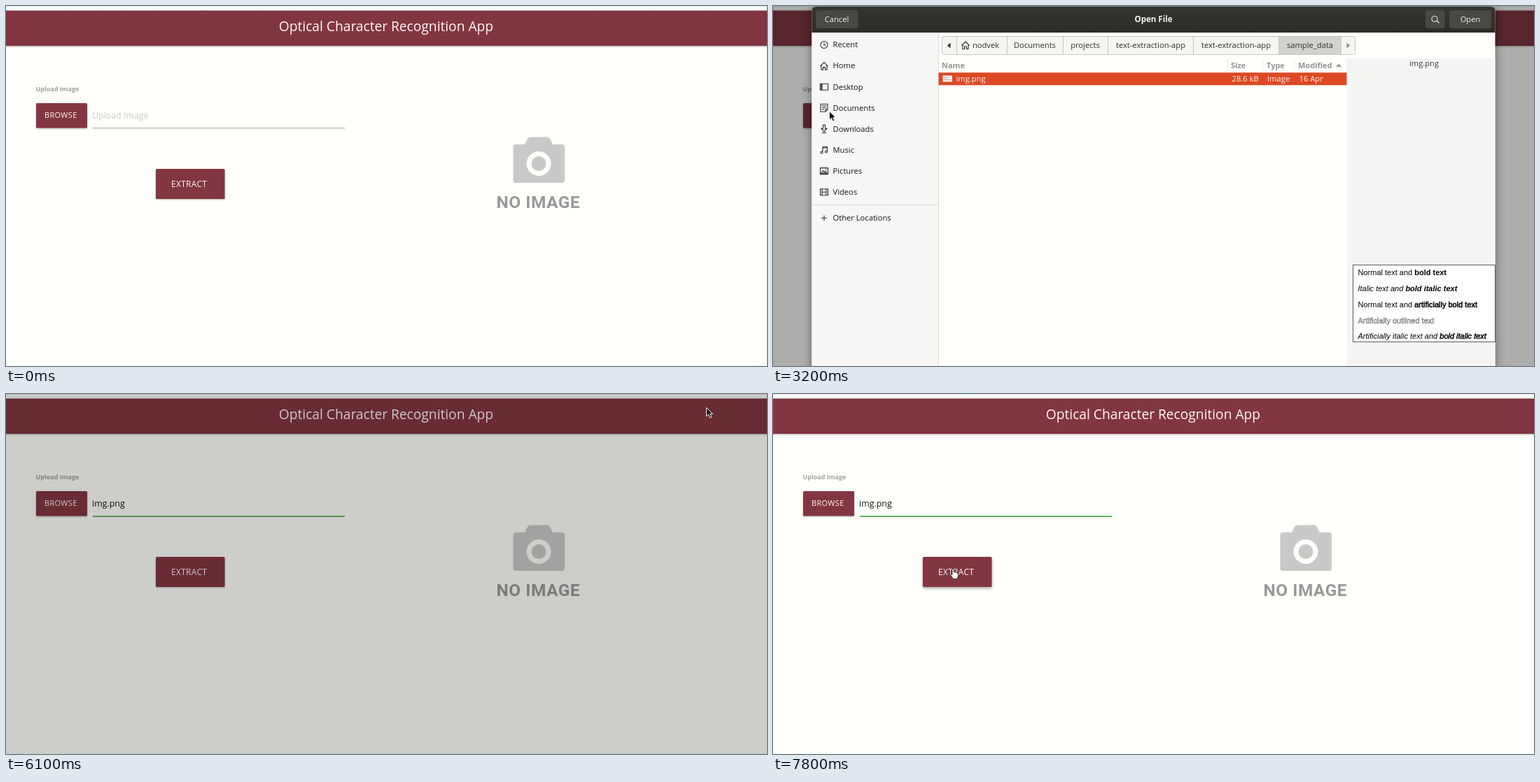
Write an HTML page that moves like this. It is 1087 by 515 pixels and loops after 8000 ms.

```html
<!DOCTYPE html>
<html lang="en">
<head>
<meta charset="utf-8">
<title>Optical Character Recognition App</title>
<style>
html, body { margin: 0; width: 100%; height: 100%; overflow: hidden; background: #fffffb; }
svg { display: block; font: 500 11.2px "Open Sans", "Noto Sans", sans-serif; }
text { white-space: pre; }
.mid { text-anchor: middle; }
.bold { font-weight: 700; }
.plain { font-weight: 400; }
.raised { fill: #823641; filter: drop-shadow(0 1px 1px rgba(0,0,0,.3)); }
.raised.hover { filter: drop-shadow(0 2px 2px rgba(0,0,0,.36)); }
.caps { fill: #fffaf7; letter-spacing: .4px; }
.icon { fill: none; stroke: #2c2c2a; stroke-width: 1.1; }
.heads { fill: #929290; font-weight: 700; font-size: 11px; }
.sample { font: 11px "Liberation Sans", Arial, sans-serif; }
.slant { font-style: italic; }
.fat { stroke: #000; stroke-width: .5; }
</style>
</head>
<body>
<svg width="1087" height="515" viewBox="0 0 1087 515">
  <defs>
    <linearGradient id="strip" x2="0" y2="1"><stop stop-color="#ededeb"/><stop offset=".4" stop-color="#fafaf8"/><stop offset="1" stop-color="#f8f8f6"/></linearGradient>
    <linearGradient id="bar" x2="0" y2="1"><stop stop-color="#353532"/><stop offset="1" stop-color="#2b2b28"/></linearGradient>
  </defs>

  <g id="page">
    <rect width="1087" height="515" fill="#fffffb"/>
    <rect width="1087" height="7" fill="url(#strip)"/>
    <rect class="raised" x="-9" y="6.5" width="1105" height="50.5"/>
    <text class="mid plain" x="543" y="36.3" font-size="19.2" fill="#fffaf7">Optical Character Recognition App</text>
    <text class="bold" x="42.5" y="121.5" font-size="9" fill="#9e9e9c">Upload Image</text>
    <rect class="raised" id="browse" x="43" y="139" width="73" height="35.5" rx="1.5"/>
    <text class="caps" x="55" y="160" font-size="10.9">BROWSE</text>
    <text class="plain" id="field" x="123" y="161" font-size="12.4"></text>
    <rect id="underline" x="124" width="360"/>
    <rect class="raised" id="extract" x="214" y="233" width="98.5" height="43" rx="1.5"/>
    <text class="caps" x="236" y="258.5" font-size="11.8">EXTRACT</text>
    <path fill="#c8cac7" d="M728 198H741L745 190Q746 187.500 749 187.500H773Q776 187.500 777 190L781 198H794Q798 198 798 202V249Q798 253 794 253H728Q724.500 253 724.500 249V202Q724.500 198 728 198Z"/>
    <circle cx="761" cy="225.500" r="14" fill="none" stroke="#fffffb" stroke-width="7"/>
    <text class="mid" x="760.300" y="289.300" font-family="Roboto, sans-serif" font-weight="600" font-size="24.400" letter-spacing=".5" fill="#999a98">NO IMAGE</text>
  </g>

  <rect id="shade" width="1087" height="515"/>

  <g id="dialog">
    <rect x="55.500" y="1" width="976" height="570" rx="6" fill="#fffffc" style="filter:drop-shadow(0 2px 7px rgba(0,0,0,.45))"/>
    <path fill="url(#bar)" d="M55.500 38V7Q55.500 1 61.500 1H1025.500Q1031.500 1 1031.500 7V38Z"/>
    <g fill="#484845"><rect x="61" y="6" width="60.500" height="26" rx="3"/><rect x="932" y="6" width="27.500" height="26" rx="3"/></g>
    <rect id="open" x="965.500" y="5.500" width="61" height="27" rx="3"/>
    <g class="mid" fill="#f2f2ee">
      <text x="91" y="22.700">Cancel</text>
      <text class="bold" x="543.500" y="22.700" font-size="11.500">Open File</text>
      <text x="996" y="22.700">Open</text>
    </g>
    <path d="M948.500 21.500L951.500 24.500M949 18.500A4 4 0 1 1 941 18.500A4 4 0 1 1 949 18.500" fill="none" stroke="#e4e4e0" stroke-width="1.200"/>

    <path fill="#f7f7f5" d="M55.500 38H236V571H55.500Z"/>
    <path stroke="#d8d8d4" d="M236.500 38V515M56 284.500H236"/>
    <g id="places" fill="#161615"></g>

    <rect x="241.500" y="43.500" width="590" height="26" rx="3" fill="#f5f5f2" stroke="#c7c7c3"/>
    <path fill="#d2d2cf" d="M723 44H811V69H723Z"/>
    <path stroke="#c7c7c3" d="M262.500 44V69M334.500 44V69M414.500 44V69M478.500 44V69M600.500 44V69M722.500 44V69M811.500 44V69"/>
    <path fill="#30302e" d="M253.500 52.500V60.500L249 56.500Z"/>
    <path fill="#8b8b88" d="M819.500 52.500V60.500L824 56.500Z"/>
    <path class="icon" d="M269.500 56.500L275 51L280.500 56.500M271 55.500V61.500H273.500V58H276.500V61.500H279V55.500"/>
    <g id="crumbs" class="mid" fill="#2e2e2c"></g>

    <path fill="#f5f5f3" d="M819.500 75H1031.500V571H819.500Z"/>
    <path stroke="#ebebe8" d="M649.500 76V95M699.500 76V95M744.500 76V95"/>
    <g class="heads"><text x="241" y="88.500">Name</text><text x="654" y="88.500">Size</text><text x="705" y="88.500">Type</text><text x="750" y="88.500">Modified</text></g>
    <path fill="#929290" d="M804 87H812L808 82.500Z"/>
    <path fill="#dd4923" d="M236.500 95.200H819.500V113.200H236.500Z"/>
    <path fill="#f6eeeb" d="M242.500 99.500H256V108.500H242.500Z"/>
    <path stroke="#b9aaa5" d="M244 102.500H250M244 105.500H254"/>
    <g fill="#fff8f4"><text x="261.500" y="108.300">img.png</text><text x="655.500" y="108.300">28.6 kB</text><text x="706" y="108.300">Image</text><text x="751.500" y="108.300">16 Apr</text></g>
    <text class="mid" x="930" y="86.300" fill="#3a3a38">img.png</text>

    <rect x="828.500" y="370.500" width="203" height="110" fill="#fffffd" stroke="#5c5c5a"/>
    <g class="sample">
      <text x="835.500" y="384.500">Normal text and <tspan class="bold">bold text</tspan></text>
      <text class="slant" x="835.500" y="407.500">Italic text and <tspan class="bold">bold italic text</tspan></text>
      <text x="835.500" y="430.500">Normal text and <tspan class="fat">artificially bold text</tspan></text>
      <text x="835.500" y="453.500" fill="#e4e4e2" stroke="#777" stroke-width=".6">Artificially outlined text</text>
      <text class="slant" x="835.500" y="475.500">Artificially italic text and <tspan class="fat">bold italic text</tspan></text>
    </g>
  </g>

  <g id="cursor" stroke-linejoin="round">
    <path id="arrow" fill="#161616" stroke="#f4f4f0" d="M.500 .500V13L3.500 10.200L5.500 15L7.800 14L5.800 9.400H9.500Z"/>
    <path id="hand" fill="#fffffb" stroke="#1c1c1c" stroke-width=".9" d="M3 1.500Q4.500 0 5.500 2V6Q7 5 8 6.500Q9.500 6 10 7.200Q11.500 7 11.500 9V12L10 15.500H4.500L.500 10Q.500 8 3 9.500Z"/>
  </g>
</svg>
<script>
const $ = id => document.getElementById(id);
const LOOP = 8000, STEP = 100;

// Sidebar icons are drawn in a 12 px box.
const places = [
  ["Recent", "M11 6A5 5 0 1 1 1 6A5 5 0 1 1 11 6M6 3V6.500H8.500"],
  ["Home", "M.500 6.500L6 1L11.500 6.500M2 5.500V11.500H4.500V8H7.500V11.500H10V5.500"],
  ["Desktop", "M.500 1.500H11.500V10.500H.500ZM2 2V10M3 2V10"],
  ["Documents", "M1 .500H11V8L8 11.500H1ZM3 3H9M3 5.500H9M3 8H6M8 11V8H11"],
  ["Downloads", "M4.500 .500H7.500V5.500H10L6 9.500L2 5.500H4.500ZM3 11.500H9"],
  ["Music", "M4 9.500V1.500H10.500V8.500M4 3H10.500M4 9.500A1.500 1.500 0 1 1 1 9.500A1.500 1.500 0 1 1 4 9.500M10.500 8.500A1.500 1.500 0 1 1 7.500 8.500A1.500 1.500 0 1 1 10.500 8.500"],
  ["Pictures", "M.500 1.500H11.500V10.500H.500ZM2 9L4.500 5.500L6.500 7.500L8 6L10 9ZM8 3.500H9.500"],
  ["Videos", "M.500 1.500H11.500V10.500H.500ZM3 1.500V10.500M9 1.500V10.500M3 6H9"],
  ["Other Locations", "M6 2V10M2 6H10"]
];
$("places").innerHTML = places.map(([name, d], i) => {
  const y = i < 8 ? 55.5 + i * 30.1 : 303.5;
  return `<path class="icon" transform="translate(67 ${y - 6})" d="${d}"/><text x="85.500" y="${y + 3.8}">${name}</text>`;
}).join("");

const crumbs = [["nodvek", 304], ["Documents", 374], ["projects", 446], ["text-extraction-app", 539.5], ["text-extraction-app", 661.5], ["sample_data", 767]];
$("crumbs").innerHTML = crumbs.map(([name, x]) => `<text x="${x}" y="60.300">${name}</text>`).join("");

// Keys are [time, ...values].
const path = [
  [1100, 8, 117], [1800, 78, 141], [1900, 90, 142], [2000, 73, 146], [2100, 80, 150],
  [3400, 80, 150], [3600, 40, 176], [3700, 20, 190], [3800, 60, 186], [4000, 210, 140],
  [4100, 290, 112], [4200, 338, 129], [4300, 373, 140], [4500, 498, 164], [4600, 498, 164],
  [4700, 645, 142], [4800, 645, 142], [4900, 772, 139], [5000, 772, 139], [5600, 1000, 19],
  [6500, 1000, 19], [6900, 489, 194], [7100, 489, 194], [7800, 253, 249]
];
const dim = [[2800, 0], [3200, .32], [6000, .32], [6200, .07], [6300, 0]];
const unfold = [[2800, 0], [2900, .4], [3000, .8], [3100, 1], [6000, 1], [6100, 0]];

function track(keys, t) {
  const i = keys.findIndex(k => k[0] > t);
  if (i < 0) return keys[keys.length - 1].slice(1);
  if (!i) return keys[0].slice(1);
  const a = keys[i - 1], b = keys[i], p = (t - a[0]) / (b[0] - a[0]);
  return a.slice(1).map((v, n) => v + (b[n + 1] - v) * p);
}

function set(id, attrs) {
  for (const name in attrs) $(id).setAttribute(name, attrs[name]);
}

function draw(now) {
  const t = Math.floor(now % LOOP / STEP) * STEP;
  const [x, y] = track(path, t), [shade] = track(dim, t), [scale] = track(unfold, t);
  const chosen = t >= 6000, pressed = t >= 5800;
  const over = (l, top, r, b) => t >= 1100 && !scale && x >= l && x < r && y >= top && y < b;
  const onExtract = over(214, 233, 312, 276);

  $("field").textContent = chosen ? "img.png" : "Upload Image";
  set("field", { fill: chosen ? "#101010" : "#c9c9c6" });
  set("underline", { y: 174.2, height: chosen ? 1.8 : 1, fill: chosen ? "#4bb44f" : "#9e9e9c" });
  $("browse").classList.toggle("hover", over(43, 139, 116, 175));
  $("extract").classList.toggle("hover", onExtract);
  set("shade", { opacity: shade });
  set("dialog", { visibility: scale ? "visible" : "hidden", transform: `translate(0 ${285 * (1 - scale)}) scale(1 ${scale})` });
  set("open", { fill: pressed ? "#20201e" : "#484845", stroke: pressed ? "#10100f" : "#30302d" });
  set("cursor", { transform: `translate(${x} ${y})`, opacity: t < 1100 ? 0 : 1 });
  set("arrow", { opacity: onExtract ? 0 : 1 });
  set("hand", { opacity: onExtract ? 1 : 0 });
}

function tick() {
  draw(performance.now());
  requestAnimationFrame(tick);
}
tick();
</script>
</body>
</html>
```
